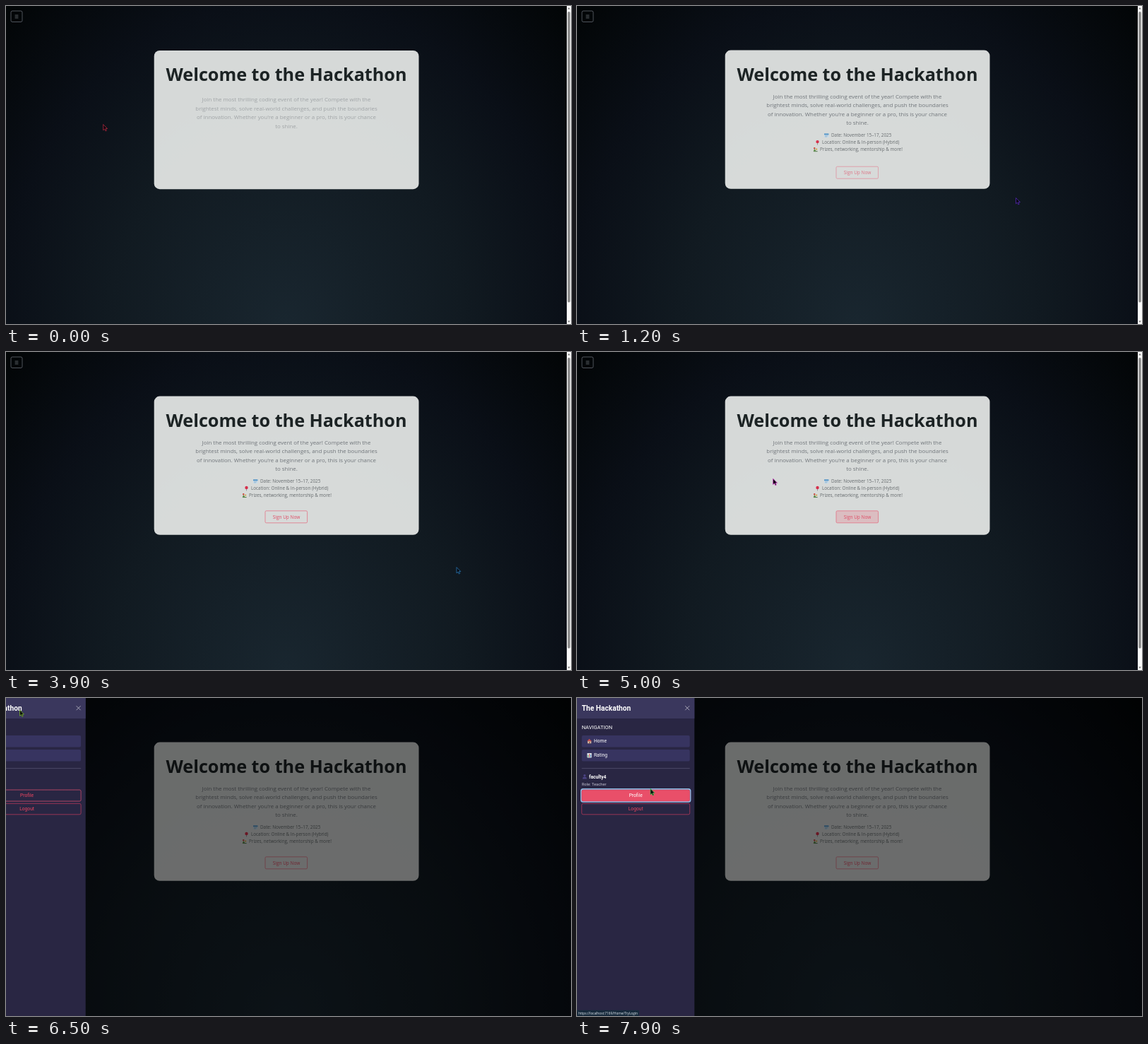
An HTML page for the animation above (8 s loop, 800x450 px).

```html
<!DOCTYPE html>
<html lang="en">
<head>
<meta charset="utf-8">
<title>Hackathon welcome page</title>
<style>
  html, body { margin: 0; width: 100%; height: 100%; overflow: hidden; background: #05080c; }
  svg { display: block; width: 100vw; height: 100vh; }
  .page { font-family: "Open Sans", "Noto Sans", sans-serif; }
  .menu { font-family: Roboto, Arial, sans-serif; font-size: 6.7px; fill: #fff; }
  .mid { text-anchor: middle; }
</style>
</head>
<body>
<svg viewBox="0 0 800 450" xmlns="http://www.w3.org/2000/svg">
  <defs>
    <radialGradient id="night" gradientUnits="userSpaceOnUse" cx="0" cy="0" r="1"
      gradientTransform="translate(397 450) scale(561 636)">
      <stop offset="0" stop-color="#19262f"/>
      <stop offset=".45" stop-color="#111a21"/>
      <stop offset=".72" stop-color="#0a0f17"/>
      <stop offset="1" stop-color="#020506"/>
    </radialGradient>
  </defs>

  <rect width="800" height="450" fill="url(#night)"/>

  <g class="page">
    <g id="toggle">
      <rect id="toggleRing" x="5.8" y="5.8" width="18.4" height="18" rx="3" fill="none" stroke="#7fa9c9" stroke-width="1.4"/>
      <rect id="toggleFill" x="7" y="7" width="16" height="15.5" rx="2" fill="#5c6875"/>
      <rect x="7" y="7" width="16" height="15.5" rx="2" fill="none" stroke="#626870" stroke-width=".8"/>
      <path id="toggleIcon" d="M12.6 13h4.8M12.6 15h4.8M12.6 17h4.8" stroke-width=".7"/>
    </g>

    <g id="card">
      <rect x="209.7" y="62.6" width="374.8" height="196.2" rx="8" fill="#fafcfa" opacity=".85"/>
      <text class="mid" x="397" y="105.8" font-size="25.2" font-weight="700" fill="#1c2324">Welcome to the Hackathon</text>
      <g id="intro" class="mid" font-size="7.9" fill="#70757a">
        <text x="397" y="130.8">Join the most thrilling coding event of the year! Compete with the</text>
        <text x="397" y="143.3">brightest minds, solve real-world challenges, and push the boundaries</text>
        <text x="397" y="155.8">of innovation. Whether you're a beginner or a pro, this is your chance</text>
        <text x="397" y="168.3">to shine.</text>
      </g>
      <g id="details" font-size="6.33" fill="#656a6d">
        <rect x="350" y="180.4" width="6.4" height="5.6" rx=".7" fill="#c9dcea"/>
        <path d="M350 180.4h6.4v1.8h-6.4z" fill="#4b8fc4"/>
        <path d="M351 183.6h4.4M351 184.9h3" stroke="#7fa6c6" stroke-width=".6"/>
        <text x="360" y="185.4">Date: November 15–17, 2025</text>
        <path d="M340.5 193.5v3" stroke="#777f86" stroke-width=".7"/>
        <circle cx="340.5" cy="192" r="2.2" fill="#d62f4b"/>
        <text x="347" y="195.4">Location: Online &amp; In-person (Hybrid)</text>
        <path d="M334.6 205.8l1.6-3.6 2.2 2.3z" fill="#5a8b42"/>
        <path d="M335.2 205.6h5.4" stroke="#4e7a45" stroke-width="1"/>
        <circle cx="336.2" cy="201.2" r="1.2" fill="#c9483e"/>
        <circle cx="339.2" cy="202.6" r="1.1" fill="#d2a13c"/>
        <text x="344" y="205.4">Prizes, networking, mentorship &amp; more!</text>
      </g>
      <g id="signUp">
        <rect id="signFill" x="367" y="224.8" width="59.6" height="17" rx="1.6" fill="#e94560"/>
        <rect x="367" y="224.8" width="59.6" height="17" rx="1.6" fill="none" stroke="#e4667b" stroke-width=".7"/>
        <text id="signText" class="mid" x="397" y="235.6" font-size="6.5">Sign Up Now</text>
      </g>
    </g>
  </g>

  <g id="scrollbar">
    <rect x="794" width="6" height="450" fill="#fafafa"/>
    <rect x="795.2" y="8" width="3.6" height="411.5" rx="1.8" fill="#8b8b8b"/>
    <path d="M795.2 4.6h3.6l-1.8-2.5zM795.2 445.6h3.6l-1.8 2.5z" fill="#777"/>
  </g>

  <rect id="backdrop" width="800" height="450"/>

  <g id="sidebar" class="menu">
    <rect width="166.3" height="450" fill="#292643"/>
    <rect width="166.3" height="29" fill="#3a375d"/>
    <text x="6.7" y="17.6" font-size="10.2" font-weight="700">The Hackathon</text>
    <path d="M153.2 11.2l6 6m0-6l-6 6" stroke="#b0afbe" stroke-width=".9"/>
    <text x="6.7" y="43.6" font-size="7.5">NAVIGATION</text>
    <g fill="#373460">
      <rect x="6.7" y="53" width="153" height="16.4" rx="2"/>
      <rect x="6.7" y="73" width="153" height="16.4" rx="2"/>
    </g>
    <path d="M14.2 61.2l3.2-3.4 3.6 3.4z" fill="#c94d4d"/>
    <path d="M15 61.2h5.2v3h-5.2z" fill="#d8b7a0"/>
    <path d="M17 64.2v-2h1.5v2z" fill="#87594a"/>
    <text x="24" y="63.4">Home</text>
    <rect x="14.4" y="78" width="6.4" height="6.4" rx=".6" fill="#dfe4e8"/>
    <path d="M15.8 83.6v-2.8" stroke="#49a35f"/>
    <path d="M17.6 83.6v-4.6" stroke="#cf4b55"/>
    <path d="M19.4 83.6v-3.6" stroke="#4b83bd"/>
    <text x="24" y="83.4">Rating</text>
    <path d="M6.7 99.6h153" stroke="#625f7d" stroke-width=".6"/>
    <g fill="#4b4384">
      <circle cx="10.8" cy="109.6" r="1.6"/>
      <path d="M7.8 114.6q0-3 3-3t3 3z"/>
    </g>
    <text x="17" y="113.8" font-weight="700">faculty4</text>
    <text x="6.7" y="123.6" font-size="5.8" fill="#c3c1d1">Role: Teacher</text>
    <rect id="profileRing" x="5.9" y="128.9" width="154.6" height="18" rx="2.6" fill="none" stroke="#92c4ee" stroke-width="1.8"/>
    <rect id="profileFill" x="6.7" y="130" width="153" height="16" rx="2" fill="#e94f69"/>
    <rect x="6.7" y="130" width="153" height="16" rx="2" fill="none" stroke="#d03e60" stroke-width=".7"/>
    <rect x="6.7" y="130" width="153" height="16" rx="2" fill="none" stroke="#f0bdc8" stroke-opacity=".4" stroke-width=".5" stroke-dasharray="1 1"/>
    <text id="profileText" class="mid" x="83.2" y="140.2">Profile</text>
    <rect x="6.7" y="149.4" width="153" height="15.4" rx="2" fill="none" stroke="#c43c5e" stroke-width=".7"/>
    <text class="mid" x="83.2" y="159.3" fill="#e94560">Logout</text>
  </g>

  <g id="status" class="page">
    <path d="M0 441.8h86.5q1.5 0 1.5 1.5V450H0z" fill="#172a3c"/>
    <text x="2" y="447.6" font-size="4.75" fill="#e4ebf1">https://localhost:7169/Home/TryLogin</text>
  </g>

  <path id="cursor" d="M0 0V8.2L2 6.5 3.3 9.4 4.6 8.8 3.4 6H5.9Z" fill="#080a10" stroke-width=".7"/>
</svg>
<script>
const LOOP = 8000;
const RISE = 8.3;
const ui = {};
document.querySelectorAll("[id]").forEach(node => ui[node.id] = node);

// time, x, y, outline hue
const pointerPath = [
  [0, 137, 167.5, 350], [400, 410, 190, 320], [700, 656, 235, 290], [900, 632, 248, 275],
  [1200, 621.5, 271.5, 260], [1800, 636, 302, 180], [2100, 638, 304, 130], [2700, 638, 304, 95],
  [4600, 638, 305, 270], [5000, 278, 179.5, 305], [5400, 122, 95, 230], [5950, 18, 16, 130],
  [6500, 19.5, 17, 85], [6800, 21, 18, 100], [7250, 70, 86, 120], [7650, 104, 128.5, 130], [8000, 104, 128.5, 130]
];

const clamp = v => Math.max(0, Math.min(1, v));
const ramp = (t, start, length) => clamp((t - start) / length);

// CSS "ease": cubic-bezier(.25, .1, .25, 1)
function ease(p) {
  const bezier = (a, b, s) => 3 * a * s * (1 - s) ** 2 + 3 * b * s * s * (1 - s) + s ** 3;
  let low = 0, high = 1;
  for (let i = 0; i < 20; i++) {
    const s = (low + high) / 2;
    if (bezier(.25, .25, s) < p) low = s; else high = s;
  }
  return bezier(.1, 1, (low + high) / 2);
}

function pointerAt(t) {
  const i = pointerPath.findIndex(key => key[0] > t);
  const from = pointerPath[i - 1], to = pointerPath[i];
  const p = ramp(t, from[0], to[0] - from[0]);
  return from.map((v, k) => v + (to[k] - v) * p);
}

const fade = (node, opacity) => node.setAttribute("opacity", opacity);
const move = (node, x, y) => node.setAttribute("transform", `translate(${x} ${y})`);
const fill = (node, color) => node.setAttribute("fill", color);

function fadeInUp(node, t, start) {
  const p = ease(ramp(t, start, 1200));
  fade(node, p);
  move(node, 0, RISE * (1 - p));
}

function draw(t) {
  move(ui.card, 0, RISE * (1 - ease(ramp(t, -900, 1200))));
  fadeInUp(ui.intro, t, -370);
  fadeInUp(ui.details, t, 180);
  fadeInUp(ui.signUp, t, 700);

  const signHover = ramp(t, 4790, 80) * (1 - ramp(t, 4880, 150));
  fade(ui.signFill, signHover);
  fill(ui.signText, signHover > .5 ? "#fff" : "#df4b64");

  const toggleHover = ramp(t, 5920, 150);
  fade(ui.toggleFill, toggleHover);
  fade(ui.toggleRing, ramp(t, 6120, 150));
  ui.toggleIcon.setAttribute("stroke", toggleHover > .5 ? "#fff" : "#70767d");

  ui.scrollbar.style.display = t < 6250 ? "" : "none";
  fade(ui.backdrop, .5 * ramp(t, 6350, 150));
  move(ui.sidebar, -166.3 * (1 - ease(ramp(t, 6382, 300))), 0);

  const profileHover = ramp(t, 7600, 150);
  fade(ui.profileFill, profileHover);
  fade(ui.profileRing, ramp(t, 7700, 150));
  fill(ui.profileText, profileHover > .5 ? "#fff" : "#e94560");
  fade(ui.status, ramp(t, 7620, 120));

  const [, x, y, hue] = pointerAt(t);
  move(ui.cursor, x, y);
  ui.cursor.setAttribute("stroke", `hsl(${hue} 65% 48%)`);
}

function tick() {
  draw(performance.now() % LOOP);
  requestAnimationFrame(tick);
}
tick();
</script>
</body>
</html>
```
